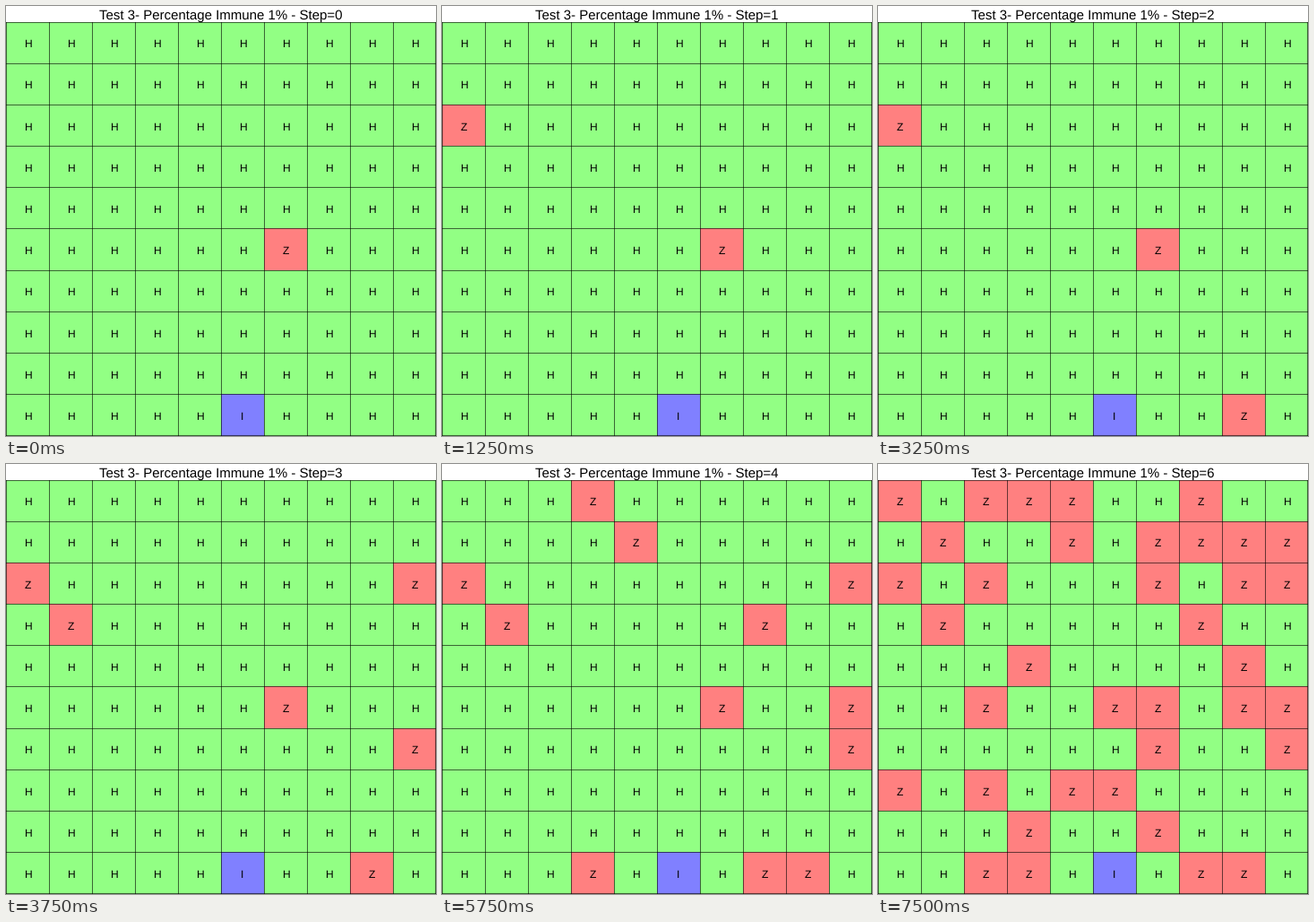
Recreate the animation shown at these times as a matplotlib script. Size 480x480 px, loop 8000 ms.

```python
import matplotlib.pyplot as plt
from matplotlib.animation import FuncAnimation
from matplotlib.patches import Rectangle

SIZE, CELLS = 480, 10
TOP, ROW, COL = 18, 46.2, 48
TICK, TICKS_PER_STEP, TICKS = 250, 5, 32

COLORS = {"H": "#92ff84", "Z": "#ff8080", "I": "#8080ff"}
IMMUNE = 95
# Cells (row * 10 + column) that turn at each step
INFECTED = [
    [56],
    [20],
    [98],
    [29, 31, 69],
    [3, 14, 37, 59, 93, 97],
    [0, 2, 16, 18, 28, 55, 74, 83, 86],
    [4, 7, 11, 17, 19, 22, 26, 43, 48, 52, 58, 66, 70, 72, 75, 92],
]
TURN_STEP = {cell: step for step, cells in enumerate(INFECTED) for cell in cells}

plt.rcParams.update({"font.family": "Liberation Sans", "text.hinting": "none"})
fig = plt.figure(figsize=(SIZE / 72, SIZE / 72), dpi=72, facecolor="white")
ax = fig.add_axes([0, 0, 1, 1])
ax.set(xlim=(0, SIZE), ylim=(SIZE, 0))
ax.axis("off")


def row_edge(row):
    return round(TOP - 0.5 + ROW * row)


def add_cell(index):
    row, col = divmod(index, CELLS)
    y = row_edge(row)
    box = Rectangle((col * COL, y), COL, row_edge(row + 1) - y, lw=0)
    ax.add_patch(box)
    label = ax.text((col + 0.5) * COL, round(46.2 + ROW * row), "",
                    size=12, ha="center", va="baseline")
    return box, label


def add_grid():
    style = dict(color="black", lw=1, alpha=0.6, snap=False,
                 solid_capstyle="butt", zorder=2)
    for i in range(CELLS + 1):
        x = min(i * COL, SIZE - 1) + 0.5
        y = min(row_edge(i), SIZE - 1) + 0.5
        ax.plot([x, x], [TOP, SIZE], **style)
        ax.plot([0, SIZE], [y, y], **style)


cells = [add_cell(i) for i in range(CELLS * CELLS)]
add_grid()
title = ax.text(SIZE / 2, 15, "", size=15, ha="center", va="baseline")


def state(index, step):
    if index == IMMUNE:
        return "I"
    return "Z" if TURN_STEP.get(index, step + 1) <= step else "H"


def update(tick):
    step = tick // TICKS_PER_STEP
    title.set_text(f"Test 3- Percentage Immune 1% - Step={step}")
    for i, (box, label) in enumerate(cells):
        kind = state(i, step)
        box.set_facecolor(COLORS[kind])
        label.set_text(kind)


anim = FuncAnimation(fig, update, frames=TICKS, interval=TICK,
                     repeat=True, repeat_delay=0)
plt.show()
```
